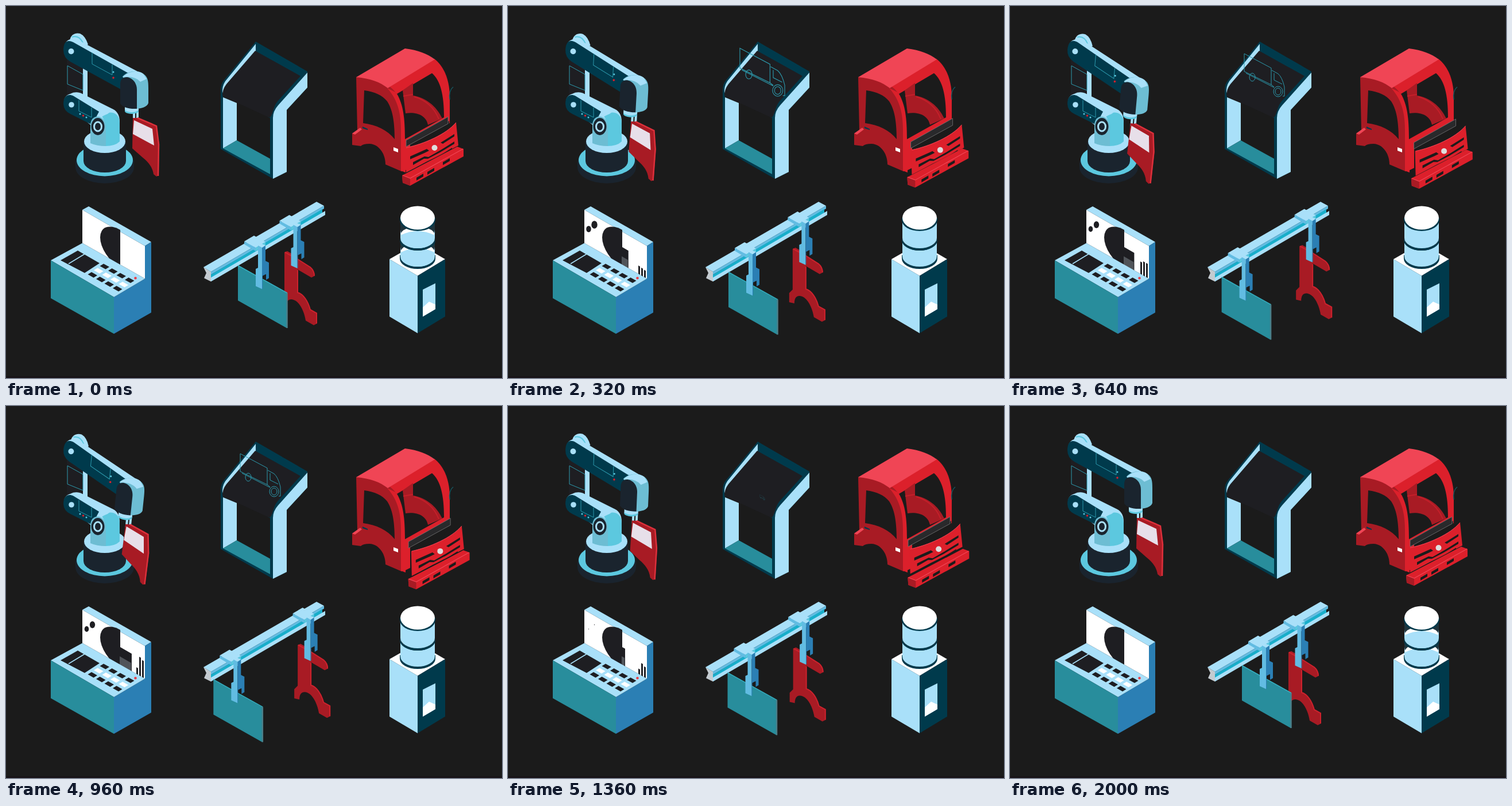
An HTML page that plays this animation: 864 px wide and 648 px high, repeating every 2.04 s.

```html
<!DOCTYPE html>
<html lang="en">
<head>
<meta charset="utf-8">
<title>Factory icons</title>
<style>
html, body { margin: 0; width: 100%; height: 100%; overflow: hidden; background: #1b1b1b; }
svg { display: block; width: 100vw; height: 100vh; }
.bg { fill: #1b1b1b; }
.ink { fill: #1e1e22; }
.light { fill: #a9e0f9; }
.cyan { fill: #5cc8df; }
.deep { fill: #003a4c; }
.navy { fill: #1a242e; }
.teal { fill: #288d9c; }
.blue { fill: #2b7fb4; }
.sky { fill: #62bce2; }
.steel { fill: #6dbdd3; }
.white { fill: #fff; }
.red { fill: #dc202b; }
.rose { fill: #f04555; }
.wine { fill: #a81b24; }
.line { fill: none; stroke: #2c9aad; stroke-width: 1; }
</style>
</head>
<body>
<svg viewBox="0 0 864 648">
  <defs>
    <g id="hanger">
      <path class="light" d="M415 410L432 400L452 411L435 421Z"/>
      <path class="sky" d="M415 410L435 421V427L415 415Z"/>
      <path class="cyan" d="M435 421L452 411V417L435 427Z"/>
      <path class="sky" d="M439 417L446 421V493L435 488V458L439 456Z"/>
      <path class="blue" d="M446 421L452 417V444L458 447V474L453 477V467L447 470V492L446 493Z"/>
      <path class="light" d="M439 417L445 414L452 417L446 421Z"/>
    </g>
    <clipPath id="upper"><path d="M687 372V404A30 18 0 0 0 747 404V372Z"/></clipPath>
    <clipPath id="lower"><path d="M687 408V436A30 18 0 0 0 747 436V408A30 18 0 0 1 687 408Z"/></clipPath>
  </defs>
  <rect class="bg" width="864" height="648"/>
  <rect y="645" width="864" height="3" fill="#171317"/>

  <g id="robot">
    <path class="navy" d="M121 269V281A51 28 0 0 0 223 281V269Z"/>
    <ellipse class="cyan" cx="172" cy="268.500" rx="49" ry="28"/>
    <path class="navy" d="M135 237V270A37 20 0 0 0 209 270V237Z"/>
    <ellipse class="light" cx="172" cy="236" rx="36" ry="20"/>
    <path class="ink" d="M106 94H135V168H106Z"/>
    <path class="light" d="M134 105H142V167L134 163Z"/>
    <path class="line" d="M107 104L134 119V147L107 136Z"/>

    <path class="light" d="M101 168C101 158 106 155 112 153C120 149 127 150 133 153L183 178C193 182 198 189 198 202V236Q190 244 174 244V212L147 207Z"/>
    <path class="cyan" d="M166 191C180 181 198 184 198 204V236Q190 244 173 244V211Q173 199 166 191Z"/>
    <path class="light" d="M158 189C170 180 180 179 187 180L177 188Q169 191 166 194Z"/>
    <path class="deep" d="M100 170C100 157 108 152 118 157L162 184L150 207L112 188Q100 182 100 170Z"/>
    <path class="steel" d="M147 239V208C147 186 174 188 174 211V244Q158 244 147 239Z"/>
    <ellipse class="navy" cx="160" cy="210" rx="11.500" ry="15"/>
    <ellipse class="navy" cx="160" cy="210" rx="6.500" ry="8" stroke="#a9e0f9" stroke-width="3"/>
    <circle class="light" cx="114" cy="172" r="4.800"/>
    <path class="line" d="M127 164V183L149 194V177"/>
    <circle class="cyan" cx="129" cy="188" r="1.500"/>
    <circle class="red" cx="134.500" cy="191" r="1.800"/>
    <circle class="cyan" cx="140" cy="194" r="1.500"/>

    <g id="arm">
      <path class="light" d="M111 61C112 49 122 46 129 48Q138 52 143 67L127 76Z"/>
      <path d="M115 54Q127 50 134 64" fill="none" stroke="#5cc8df" stroke-width="2"/>
      <path class="light" d="M102 68C106 56 118 56 127 60L233 116L219 136Z"/>
      <path class="deep" d="M100 77C100 62 107 58 117 63L213 117L207 149L112 97Q100 90 100 77Z"/>
      <circle class="light" cx="113.500" cy="79" r="5"/>
      <path class="line" d="M150 81V101L185 120V102"/>
      <circle class="cyan" cx="187" cy="115" r="1.500"/>
      <circle class="red" cx="187" cy="125" r="1.800"/>

      <path class="light" d="M221 176H225V202L221 200ZM227 176H231V204L227 202Z"/>
      <path class="wine" d="M221 195L230 195L262 209L267 241L266 295L262 297L257 293C255 279 246 270 237 263L220 248Z"/>
      <path d="M229 195L262 209L266 241L265 296" fill="none" stroke="#dc303b" stroke-width="2.500"/>
      <path fill="#e7dfe9" d="M223 199L255 214L258 243L221 223Z"/>

      <path class="light" d="M207 172H231V182A12 5 0 0 1 207 182Z"/>
      <path class="cyan" d="M207 180A12 5 0 0 0 231 180V183A12 5 0 0 1 207 183Z"/>
      <path class="steel" d="M203 123C212 113 229 111 239 118C247 123 248 130 248 143V169C246 176 235 179 224 179L214 140Z"/>
      <path class="light" d="M203 124C213 113 230 111 239 118L245 127L234 132Q224 121 203 124Z"/>
      <path class="navy" d="M199 170V136C199 116 228 122 228 146V179Q206 180 199 170Z"/>
    </g>
  </g>

  <g id="kiosk">
    <path class="deep" d="M435 62L525 114V142L489 181V289L465 301L374 249V147Q374 136 380 129Z"/>
    <path class="light" d="M525 116V142L489 181V289L465 301V195Q465 183 474 173Z"/>
    <path class="light" d="M435 66V79L384 139L377 152Q376 140 382 131Z"/>
    <path class="ink" d="M434 78L513 122L473 166C465 176 466 186 460 194C440 192 399 172 377 156Q377 145 384 136Z"/>
    <path class="bg" d="M378 157L460 195V293L378 247Z"/>
    <path class="light" d="M378 159L402 169V234L378 248Z"/>
    <path class="teal" d="M378 248L402 234L460 266V293Z"/>
    <g id="sketch" class="line">
      <path d="M408 83L455 108V137L408 114ZM411 117L460 142M456 112L467 118Q474 124 478 141V157H475M460 117V129L474 136M455 137L460 141"/>
      <ellipse cx="422" cy="124" rx="5" ry="7"/>
      <ellipse cx="467" cy="149" rx="8" ry="9"/>
      <ellipse cx="467" cy="149" rx="5" ry="6"/>
    </g>
  </g>

  <g id="cab">
    <path class="red" d="M664 143L746 92C766 107 773 135 773 158V204L696 246V290L688 287Z"/>
    <path class="wine" d="M610 124C640 124 669 134 680 153Q691 172 689 288L661 276C661 256 648 240 633 240Q622 240 618 244L603 242V222L612 217Z"/>
    <path class="red" d="M664 143L678 150C692 170 694 195 694 216V286L688 288V216C688 183 681 162 664 143Z"/>
    <path class="rose" d="M610 124L695 74C718 77 734 83 747 93L665 143C652 133 635 126 610 124Z"/>
    <path class="bg" d="M624 147C642 149 656 156 664 166C673 180 677 200 677 232C664 216 646 207 622 204Z"/>
    <path class="bg" d="M681 153L742 117C757 130 763 155 763 194L695 232C695 195 692 172 681 153Z"/>
    <path class="wine" d="M691 147L709 134V156C730 159 750 174 760 196L735 207C732 190 714 184 696 187Z"/>
    <path d="M692 157L709 154M711 158Q742 167 754 197" fill="none" stroke="#c41f2a" stroke-width="2"/>
    <path class="bg" d="M704 240L772 200V215L704 282Z"/>
    <path class="red" d="M694 234L704 238V282L694 287Z"/>
    <path class="rose" d="M603 222L617 212L620 215L608 224Z"/>
    <path class="deep" d="M621 210L630 214V216L621 213Z"/>
    <path class="white" d="M675 246L683 249V255L675 252Z"/>
    <path d="M773 163Q771 147 779 141" fill="none" stroke="#175760" stroke-width="1.500"/>
    <path id="strip" d="M697 234L770 193V205L697 245Z" fill="#29292b" stroke="#777" stroke-width=".8"/>
    <g id="grille">
      <path class="red" d="M696 247C728 240 766 224 784 203L788 243L697 290Z"/>
      <path d="M697 247C729 240 766 224 784 203" fill="none" stroke="#f04555" stroke-width="1"/>
      <path class="bg" d="M704 262L733 249L737 252L729 256L704 267ZM757 238L781 223V227L761 240ZM709 272L729 262L736 263L757 251L781 236V240L756 255L735 266L728 266L709 277ZM713 282L733 271L755 261L777 247V251L755 265L733 276Z"/>
      <circle cx="746.500" cy="247" r="5" fill="#dedede"/>
    </g>
    <g id="bumper">
      <path class="red" d="M690 295L698 291L786 245L797 249V262L704 313L691 308Z"/>
      <path class="wine" d="M690 295L704 300V313L691 308Z"/>
      <path d="M691 295L704 300L796 249" fill="none" stroke="#f04555" stroke-width="1.200"/>
      <path class="bg" d="M715 299L727 292V297L715 304ZM734 289L746 282V287L734 294ZM761 272L773 265V270L761 277Z"/>
    </g>
  </g>

  <g id="console">
    <path class="white" d="M133 355L242 418V475L133 413Z"/>
    <path class="light" d="M133 355L144 349L253 411L242 418Z"/>
    <path class="blue" d="M242 418L253 411V534L188 571V507L242 475Z"/>
    <path class="ink" transform="matrix(35 20 0 33 199 423)" d="M0-1A1 1 0 0 0 0 1Z"/>
    <path id="block" class="ink"/>
    <path id="shade" fill="#505459"/>
    <g id="gears" class="ink">
      <ellipse cx="150.500" cy="381" rx="4.700" ry="6"/>
      <ellipse cx="140.500" cy="388.500" rx="3.800" ry="5"/>
    </g>
    <path id="bars" class="ink"/>
    <path class="light" d="M78 443L133 413L242 475L188 507Z"/>
    <path class="teal" d="M78 443L188 507V571L78 509Z"/>
    <path class="ink" d="M95 443L125 426L163 448L137 465Z"/>
    <path d="M109 449L137 432" stroke="#a9e0f9" stroke-width="1.500"/>
    <g id="keys"></g>
    <circle cx="225.500" cy="474" r="2.300" fill="#e9404a"/>
  </g>

  <g id="conveyor">
    <path d="M344 455L357 463V480L345 474L349 465Z" fill="#c4cbd0"/>
    <path class="light" d="M344 455L541 341L554 348L357 463Z"/>
    <path class="sky" d="M357 463L554 348V353L357 468Z"/>
    <path fill="#18aeca" d="M357 468L551 354V361L357 474Z"/>
    <path class="light" d="M357 473L556 357V364L357 480Z"/>
    <g id="right">
      <path class="wine" d="M485 429L490 427L508 437V442L530 455Q538 461 538 470L532 473L508 459V499C518 502 526 514 530 529L542 535V553L536 556L522 548C520 535 512 512 497 511Q488 511 488 524L479 522V506L485 500Z"/>
      <path d="M486 429L508 441L530 455Q537 461 537 470M508 460V499C518 502 526 514 530 529L541 535V553" fill="none" stroke="#cd222d" stroke-width="2"/>
      <use href="#hanger" x="61.500" y="-36"/>
    </g>
    <g id="left">
      <path class="teal" d="M404 452L489 500V561L404 513Z"/>
      <path d="M404 452L490 500" stroke="#35afc0" stroke-width="1.500"/>
      <path d="M489.500 500V561" stroke="#4b7e88" stroke-width="2.500"/>
      <use href="#hanger"/>
    </g>
  </g>

  <g id="cooler">
    <path class="white" d="M668 441L717 413L765 441L717 470Z"/>
    <path class="light" d="M668 441L717 470V570L668 541Z"/>
    <path class="deep" d="M717 470L765 441V541L717 570Z"/>
    <path class="light" d="M726 494L748 483V528L726 541Z"/>
    <path class="white" d="M726 525L737 515L748 520V528L726 541Z"/>
    <path class="deep" d="M686 434V440A31 18 0 0 0 748 440V434Z"/>
    <path fill="#20343c" d="M687 370V436A30 18 0 0 0 747 436V370Z"/>
    <g clip-path="url(#lower)"><g class="water"></g></g>
    <path class="deep" d="M686 404V408A31 18 0 0 0 748 408V404A31 18 0 0 1 686 404Z"/>
    <g clip-path="url(#upper)"><g class="water"></g></g>
    <path class="deep" d="M686 369V373A31 19 0 0 0 748 373V369Z"/>
    <ellipse class="white" cx="717" cy="369" rx="30" ry="20.500"/>
  </g>
</svg>
<script>
const LOOP = 2040;
const $ = id => document.getElementById(id);
const unit = x => Math.min(1, Math.max(0, x));
const quadOut = u => 1 - (1 - u) ** 2;
const sineOut = u => Math.sin(u * Math.PI / 2);
const smooth = u => u * u * (3 - 2 * u);
const backOut = u => 1 + 2.9 * (u - 1) ** 3 + 1.9 * (u - 1) ** 2;
const backIn = u => 2.9 * u ** 3 - 1.9 * u * u;

// Goes from 0 to 1 during [0, peak], then back to 0 during [leave, end].
function swing(t, peak, leave, end, rise, fall) {
  return t < leave ? rise(unit(t / peak)) : 1 - fall(unit((t - leave) / (end - leave)));
}

function track(t, values, step = 320) {
  const i = Math.min(values.length - 2, Math.floor(t / step));
  return values[i] + (values[i + 1] - values[i]) * unit(t / step - i);
}

const move = (id, x, y) => $(id).setAttribute('transform', `translate(${x} ${y})`);
const scaleAt = (el, s, x, y) =>
  el.setAttribute('transform', `translate(${x} ${y}) scale(${Math.max(0, s)}) translate(${-x} ${-y})`);

const water = document.querySelectorAll('.water');
[435, 405].forEach((base, i) => {
  const top = base - 33;
  water[i].innerHTML =
    `<path class="light" d="M687 ${top}V${base + 40}H747V${top}A30 18 0 0 1 687 ${top}Z"/>` +
    `<ellipse class="white" cx="717" cy="${top + 7}" rx="29" ry="12"/>` +
    `<path class="light" d="M688 ${top + 9}Q717 ${top - 5} 746 ${top + 9}V${top + 40}H688Z"/>`;
});

let keys = '';
for (let row = 0; row < 3; row++) {
  for (let col = 0; col < 4; col++) {
    const x = 170 + col * 14.5 - row * 10.5, y = 449 + col * 8 + row * 7.3;
    keys += `<path class="${row === 1 ? 'white' : 'ink'}" d="M${x} ${y}l10 5.600l-6.500 4l-10-5.600z"/>`;
  }
}
$('keys').innerHTML = keys;

function drawRobot(t) {
  const p = swing(t, 1000, 1000, 2000, quadOut, quadOut);
  $('arm').setAttribute('transform', `rotate(${6 * p} 113 78)`);
}

function drawCab(t) {
  const slide = (id, p, d) => move(id, d * p, d * p * 0.6);
  slide('strip', swing(t, 640, 700, 1340, sineOut, smooth), 6.5);
  slide('grille', swing(t, 800, 900, 1680, quadOut, smooth), 10);
  slide('bumper', swing(t, 1120, 1120, 2000, quadOut, sineOut), 10.8);
}

function drawConsole(t) {
  const w = 20 * swing(t, 1000, 1000, 1720, quadOut, quadOut);
  const drop = w * 0.57;
  $('block').setAttribute('d', `M199 420l${w} ${drop}v31l${-w} ${-drop}z`);
  $('shade').setAttribute('d', `M198 436l${w} ${drop}v17l${-w} ${-drop}z`);
  const heights = [[0, 15, 22, 12, 13, 0, 0], [0, 14, 25, 33, 25, 13, 0], [0, 13, 25, 30, 21, 13, 0]];
  $('bars').setAttribute('d', heights.map((list, i) => {
    const h = track(t, list);
    return h > 0.2 ? `M${227 + i * 5} ${467 + i * 2.8}v${-h}l3 1.700v${h}z` : '';
  }).join(''));
}

function drawConveyor(t) {
  const p = swing(t, 1040, 1040, 2000, sineOut, sineOut);
  move('left', -43 * p, 24.6 * p);
  move('right', 23.3 * p, -12.8 * p);
}

function draw(t) {
  drawRobot(t);
  drawCab(t);
  drawConsole(t);
  drawConveyor(t);
  const pop = swing(t, 520, 1000, 1370, backOut, backIn);
  scaleAt($('sketch'), pop, 443, 165);
  $('sketch').style.display = pop > 0.01 ? '' : 'none';
  for (const gear of $('gears').children) {
    scaleAt(gear, pop, gear.getAttribute('cx'), gear.getAttribute('cy'));
  }
  const full = swing(t, 300, 1420, 2000, quadOut, quadOut);
  water.forEach(el => el.setAttribute('transform', `translate(0 ${18 - 36 * full})`));
}

function tick(now) {
  const t = now % LOOP;
  draw(Math.min(2000, Math.floor(t / 40) * 40));
  requestAnimationFrame(tick);
}
draw(0);
requestAnimationFrame(tick);
</script>
</body>
</html>
```
